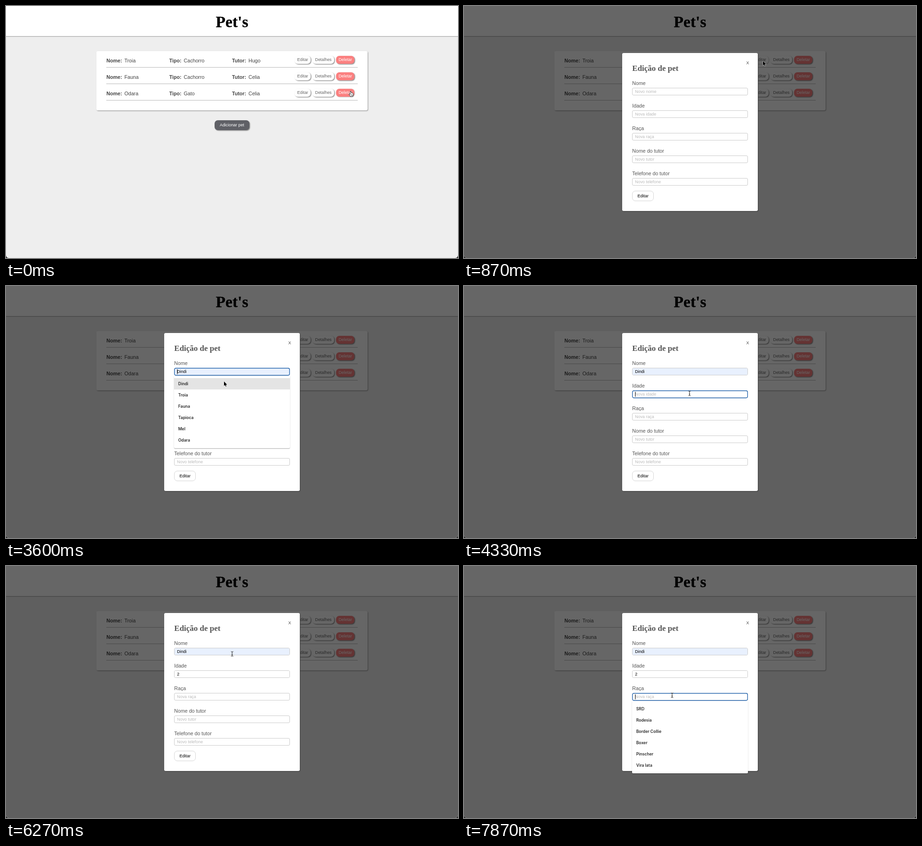
These frames come from a looping animation (960 by 536 pixels, 8 s). An HTML page:

```html
<!DOCTYPE html>
<html lang="pt-BR">
<head>
<meta charset="utf-8">
<title>Pet's</title>
<style>
  html, body { margin: 0; width: 100%; height: 100%; overflow: hidden; background: #222; }
  body { font: 10.667px "Liberation Sans", Arial, sans-serif; color: #444; }
  * { box-sizing: border-box; }
  #stage { position: absolute; left: 0; top: 0; width: 960px; height: 536px; overflow: hidden; background: #eee; border-radius: 0 0 6px 6px; }
  #stage * { white-space: nowrap; }
  h1, h2 { margin: 0; font-family: "Liberation Serif", "Times New Roman", serif; font-weight: bold; }

  header { position: absolute; left: 0; top: 0; width: 960px; height: 64px; background: #fff; box-shadow: 0 1px 1.3px #999; }
  h1 { font-size: 33.6px; line-height: 68px; text-align: center; color: #000; -webkit-text-stroke: .3px #000; }

  .card { position: absolute; left: 192px; top: 96px; width: 576px; height: 126px; background: #fff; border-radius: 3px; box-shadow: 1px 1.3px 2px #999; }
  .row { position: absolute; left: 21.3px; width: 533.4px; height: 34.8px; border-bottom: 1px solid #b9b9b9; line-height: 20px; padding-top: 10px; }
  .row p { position: absolute; margin: 0; }
  .row p:nth-child(2) { left: 133.4px; }
  .row p:nth-child(3) { left: 266.7px; }
  .row b { margin-right: 5px; }
  .btn { position: absolute; top: 10.4px; height: 17px; font-size: 8.889px; line-height: 17px; padding: 0 5.3px; border-radius: 7px; background: #fff; color: #666; box-shadow: 1.3px 1.3px 2px #888; }
  .edit { left: 400px; }
  .info { left: 437.9px; }
  .del { left: 487.8px; color: #fff; background: #fb8080; }
  .add { left: 443px; top: 243px; height: 21.4px; line-height: 21.4px; padding: 0 11px; background: #5f6066; color: #fff; }
  .leave { animation: leave 8s step-end infinite; }
  .enter { animation: enter 8s step-end infinite; }

  .shade, .modal { animation: open 8s step-end infinite; }
  .shade { position: absolute; inset: 0; background: rgba(0,0,0,.6); }
  .modal { position: absolute; left: 336px; top: 99.5px; width: 288px; height: 336.5px; background: #fff; border-radius: 3px; box-shadow: 1px 1.3px 2px #444; }
  h2 { position: absolute; left: 21.3px; top: 20.5px; font-size: 17px; line-height: 25px; color: #555; }
  .close { position: absolute; left: 263.5px; top: 11px; font-size: 8.889px; line-height: 20px; }
  .field { position: absolute; left: 21.3px; width: 245.4px; }
  .field label { display: block; height: 20.6px; line-height: 20.6px; color: #555; }
  .field div { position: relative; height: 16.2px; border: 1px solid #ccc; border-radius: 3px; font-size: 8.889px; line-height: 14.4px; overflow: hidden; }
  .field i, .field u { position: absolute; left: 5px; top: 0; font-style: normal; text-decoration: none; }
  .field i { color: #bbb; }
  .field u { left: 0; width: 100%; height: 100%; padding-left: 5px; color: #000; background: #fff; }
  .field .name { background: #e8f0fe; animation: name 8s step-end infinite; }
  .age { animation: age 8s step-end infinite; }
  .send { position: absolute; left: 21.3px; top: 293.3px; width: 46px; height: 22px; border: 1px solid #d6d6d6; border-radius: 7px; font-size: 9px; line-height: 20px; text-align: center; color: #000; }

  .ring { position: absolute; left: 20px; top: 73.5px; width: 248px; height: 19px; animation: focus 8s step-end infinite; }
  .caret { animation: caret 8s step-end infinite; }

  .menu { position: absolute; left: 21.4px; width: 245.2px; height: 154.2px; padding-top: 4.8px; background: #fff; border-radius: 0 0 2px 2px; box-shadow: 0 1px 1.5px rgba(0,0,0,.35); font: 600 8.6px/24px Inter, Roboto, sans-serif; color: #2b2b2b; animation: 8s step-end infinite; }
  .menu div { height: 24px; padding-left: 8.3px; }
  .menu .hot { animation: hot 8s step-end infinite; }

  .cursor { position: absolute; left: 0; top: 0; width: 0; height: 0; animation: path 8s ease-in-out infinite; }
  .cursor svg { position: absolute; left: -10px; top: -10px; width: 30px; height: 30px; animation: 8s step-end infinite; }

  @keyframes open { 0% { opacity: 0; } 10.87%, 100% { opacity: 1; } }
  @keyframes leave { 0% { box-shadow: .7px .7px 1.5px #aaa; } 5.87%, 100% { box-shadow: 1.3px 1.3px 2px #888; } }
  @keyframes enter { 0%, 13.37%, 100% { color: #666; box-shadow: 1.3px 1.3px 2px #888; } 9.99% { color: #777; box-shadow: .7px .7px 1.5px #aaa; } }
  @keyframes focus {
    0% { opacity: 0; transform: none; }
    17.12% { opacity: 1; transform: none; }
    52.49% { opacity: 1; transform: translateY(48px); }
    75% { opacity: 0; transform: translateY(96px); }
    93.37%, 100% { opacity: 1; transform: translateY(96px); }
  }
  @keyframes caret {
    0%, 17.12%, 31.62%, 44.12%, 52.49%, 64.99%, 93.37%, 100% { opacity: 1; }
    23.37%, 39.12%, 45.87%, 59.12%, 70.87% { opacity: 0; }
  }
  @keyframes name { 0% { opacity: 0; } 43.37%, 100% { opacity: 1; } }
  @keyframes age { 0% { opacity: 0; } 70.87%, 100% { opacity: 1; } }
  @keyframes hot { 0% { background: #fff; } 43.37%, 100% { background: #e4e4e4; } }
  @keyframes menu1 { 0%, 45.87%, 100% { opacity: 0; } 19.99% { opacity: 1; } }
  @keyframes menu2 { 0%, 70.87%, 100% { opacity: 0; } 55.87% { opacity: 1; } }
  @keyframes menu3 { 0% { opacity: 0; } 98.37%, 100% { opacity: 1; } }

  @keyframes hand { 0% { opacity: 1; } 9.99%, 100% { opacity: 0; } }
  @keyframes arrow { 0%, 15.9%, 51%, 76.9%, 100% { opacity: 0; } 9.99%, 40.8%, 72.4% { opacity: 1; } }
  @keyframes beam { 0%, 40.8%, 72.4% { opacity: 0; } 15.9%, 51%, 76.9%, 100% { opacity: 1; } }

  @keyframes path {
    0%, .44% { transform: translate(732px, 181px); }
    4.1%, 5.4% { transform: translate(649px, 119px); }
    6.6% { transform: translate(639px, 109px); }
    7.5%, 12.9% { transform: translate(635px, 117px); }
    16.6%, 27.49% { transform: translate(492px, 183.5px); }
    27.5%, 31.2% { transform: translate(492.7px, 183.5px); }
    33.3%, 38.7% { transform: translate(500px, 183px); }
    44.9%, 48% { transform: translate(463px, 203px); }
    51.6%, 68.3% { transform: translate(479px, 228.5px); }
    68.37%, 70.5% { transform: translate(479px, 228px); }
    74.4% { transform: translate(484px, 159px); }
    78.3%, 81.3% { transform: translate(480.3px, 187px); }
    83.3%, 85.5% { transform: translate(455px, 268px); }
    90%, 100% { transform: translate(442px, 275px); }
  }
</style>
</head>
<body>
<div id="stage">
  <header><h1>Pet's</h1></header>

  <div class="card">
    <div class="row" style="top:0">
      <p><b>Nome:</b>Troia</p><p><b>Tipo:</b>Cachorro</p><p><b>Tutor:</b>Hugo</p>
      <span class="btn edit enter">Editar</span><span class="btn info">Detalhes</span><span class="btn del">Deletar</span>
    </div>
    <div class="row" style="top:34.9px">
      <p><b>Nome:</b>Fauna</p><p><b>Tipo:</b>Cachorro</p><p><b>Tutor:</b>Celia</p>
      <span class="btn edit">Editar</span><span class="btn info">Detalhes</span><span class="btn del">Deletar</span>
    </div>
    <div class="row" style="top:69.8px">
      <p><b>Nome:</b>Odara</p><p><b>Tipo:</b>Gato</p><p><b>Tutor:</b>Celia</p>
      <span class="btn edit">Editar</span><span class="btn info">Detalhes</span><span class="btn del leave">Deletar</span>
    </div>
  </div>
  <span class="btn add">Adicionar pet</span>

  <div class="shade"></div>

  <div class="modal">
    <h2>Edição de pet</h2>
    <span class="close">X</span>
    <div class="field" style="top:54px"><label>Nome</label><div><i>Novo nome</i><u class="name">Dindi</u></div></div>
    <div class="field" style="top:102px"><label>Idade</label><div><i>Nova idade</i><u class="age">2</u></div></div>
    <div class="field" style="top:150px"><label>Raça</label><div><i>Nova raça</i></div></div>
    <div class="field" style="top:198px"><label>Nome do tutor</label><div><i>Novo tutor</i></div></div>
    <div class="field" style="top:246px"><label>Telefone do tutor</label><div><i>Novo telefone</i></div></div>
    <span class="send">Editar</span>

    <svg class="ring" viewBox="0 0 248 19">
      <rect x="1.7" y="1.8" width="244.6" height="15.2" rx="3.4" fill="none" stroke="#2a68ae" stroke-width="1.4"/>
      <rect class="caret" x="7.4" y="4" width="1" height="10.6"/>
    </svg>

    <div class="menu" style="top:91.7px;animation-name:menu1">
      <div class="hot">Dindi</div><div>Troia</div><div>Fauna</div><div>Tapioca</div><div>Mel</div><div>Odara</div>
    </div>
    <div class="menu" style="top:139.7px;animation-name:menu2">
      <div>7</div><div>6</div><div>5</div><div>13</div><div>2</div><div>3</div>
    </div>
    <div class="menu" style="top:187.7px;animation-name:menu3">
      <div>SRD</div><div>Rodesia</div><div>Border Collie</div><div>Boxer</div><div>Pinscher</div><div>Vira lata</div>
    </div>
  </div>

  <div class="cursor">
    <svg viewBox="-10 -10 30 30" style="animation-name:hand">
      <path d="M-1 .8Q0-.4 1 .8L1.6 4L3.2 4L4.6 4.6L5.8 5.4V8L4.8 10V11.6H-.6L-1.4 9.6L-3.6 6.8Q-3.4 5.4-2 6L-.8 7Z" fill="#fff" stroke="#222" stroke-width=".9" stroke-linejoin="round"/>
      <path d="M1.2 7.2V9.8M2.6 7.2V9.8M4 7.2V9.8" stroke="#222" stroke-width=".6"/>
    </svg>
    <svg viewBox="-10 -10 30 30" style="animation-name:arrow">
      <path d="M0 0V9.4L2.1 7.5L3.6 10.8L5.1 10.1L3.7 7H6.6Z" fill="#000" stroke="#fff" stroke-width=".9" stroke-linejoin="round" paint-order="stroke"/>
    </svg>
    <svg viewBox="-10 -10 30 30" style="animation-name:beam">
      <path d="M-2.4-5Q0-5 0-3.6Q0-5 2.4-5M0-3.8V3.8M-2.4 5Q0 5 0 3.6Q0 5 2.4 5M-1.2 1.4H1.2" fill="none" stroke="#222" stroke-width="1"/>
    </svg>
  </div>
</div>
</body>
</html>
```
